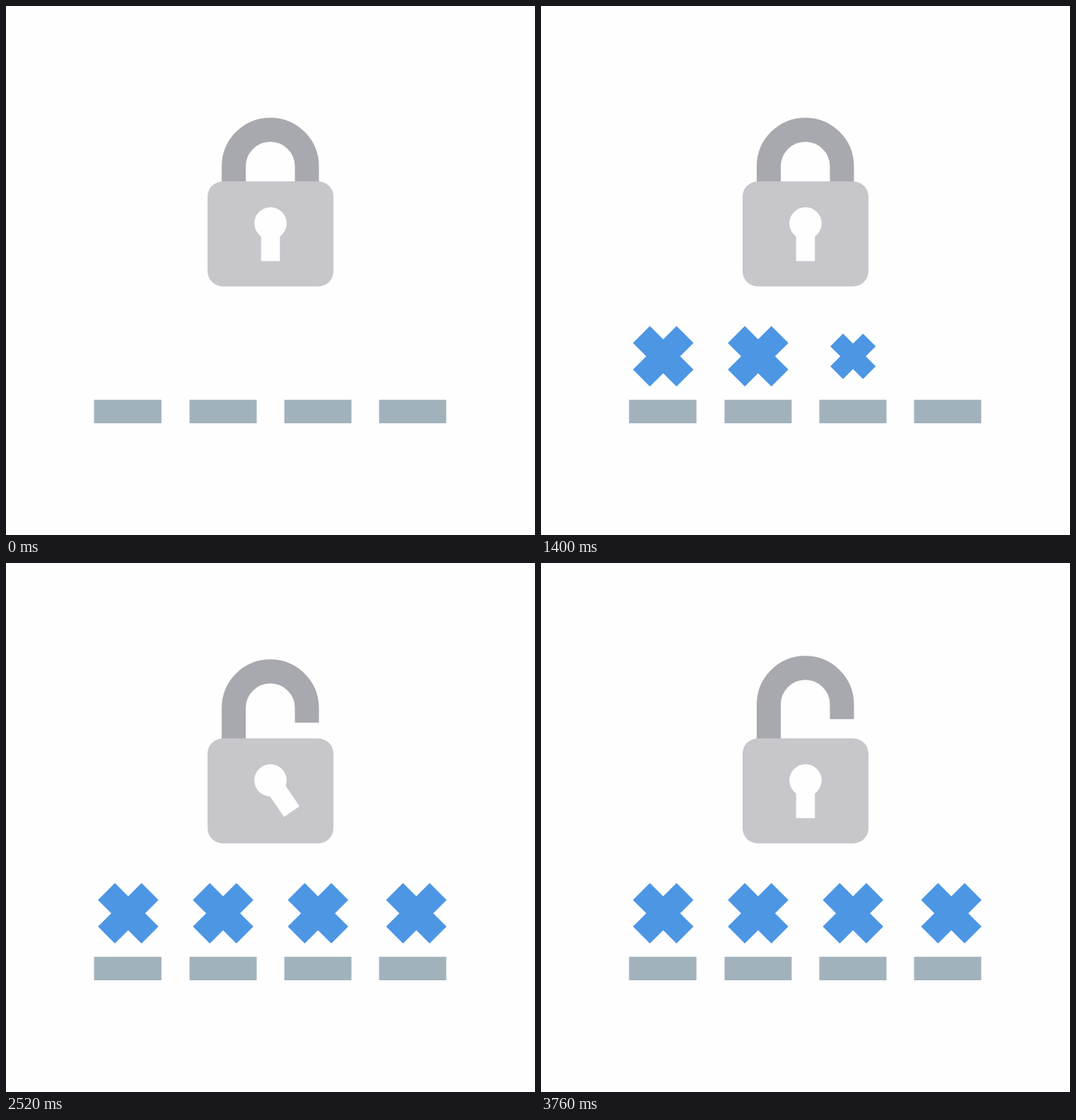
Write an HTML page that moves like this. It is 748 by 748 pixels and loops after 4840 ms.

```html
<!DOCTYPE html>
<html lang="en">
<head>
<meta charset="utf-8">
<title>Passcode lock</title>
<style>
  html, body { margin: 0; width: 100%; height: 100%; overflow: hidden; background: #fefefe; }
  svg { display: block; width: 100%; height: 100%; }
</style>
</head>
<body>
<svg viewBox="0 0 748 748">
  <path id="shackle" fill="none" stroke="#a8a9ae" stroke-width="34"/>
  <rect x="285" y="248" width="178" height="148.5" rx="21.5" fill="#c7c6cb"/>
  <g id="keyhole" fill="#fefefe">
    <circle cx="374" cy="307.3" r="22.8"/>
    <rect x="360.7" y="307.3" width="26.6" height="53.4"/>
  </g>
  <g fill="#a1b2bd">
    <rect x="124.5" y="556.8" width="95.3" height="33.2"/>
    <rect x="259.5" y="556.8" width="95" height="33.2"/>
    <rect x="393.5" y="556.8" width="95" height="33.2"/>
    <rect x="527.5" y="556.8" width="95" height="33.2"/>
  </g>
  <g id="marks" stroke="#4c96e4" stroke-width="33.9"></g>
</svg>
<script>
  const LOOP = 4840, STEP = 40;
  const $ = id => document.getElementById(id);
  const clamp = v => Math.min(1, Math.max(0, v));

  const marks = [[172.8, 800], [307, 1000], [441.2, 1320], [580.2, 1560]].map(([x, start]) => {
    const el = document.createElementNS('http://www.w3.org/2000/svg', 'path');
    el.setAttribute('d', 'M-30.8-30.8 30.8 30.8M-30.8 30.8 30.8-30.8');
    $('marks').append(el);
    return { el, x, start };
  });

  function liftAt(t) {
    if (t < 2200) return 0;
    return 26.7 * (1 - (1 - clamp((t - 2150) / 1300)) ** 5);
  }

  // Quick turn, then a slow swing back
  function turnAt(t) {
    if (t < 2200 || t >= 3760) return 0;
    return t < 2461
      ? 42 * (1 - Math.exp((2160 - t) / 38.8))
      : 42 * Math.exp((2461 - t) / 290);
  }

  function draw(t) {
    for (const { el, x, start } of marks) {
      const size = clamp((t - start + STEP) / (4 * STEP));
      el.setAttribute('transform', `translate(${x} 495.3) scale(${size})`);
      el.setAttribute('visibility', size > 0 ? 'visible' : 'hidden');
    }
    const lift = liftAt(t), y = 226.7 - lift;
    $('shackle').setAttribute('d',
      `M322 262V${y}A51.75 51.75 0 0 1 425.5 ${y}V${lift ? 247.4 - lift : 262}`);
    $('keyhole').setAttribute('transform', `rotate(${-turnAt(t)} 374 307.3)`);
  }

  const begin = performance.now();
  function tick() {
    const t = (performance.now() - begin) % LOOP;
    draw(Math.floor(t / STEP) * STEP);
    requestAnimationFrame(tick);
  }
  tick();
</script>
</body>
</html>
```
